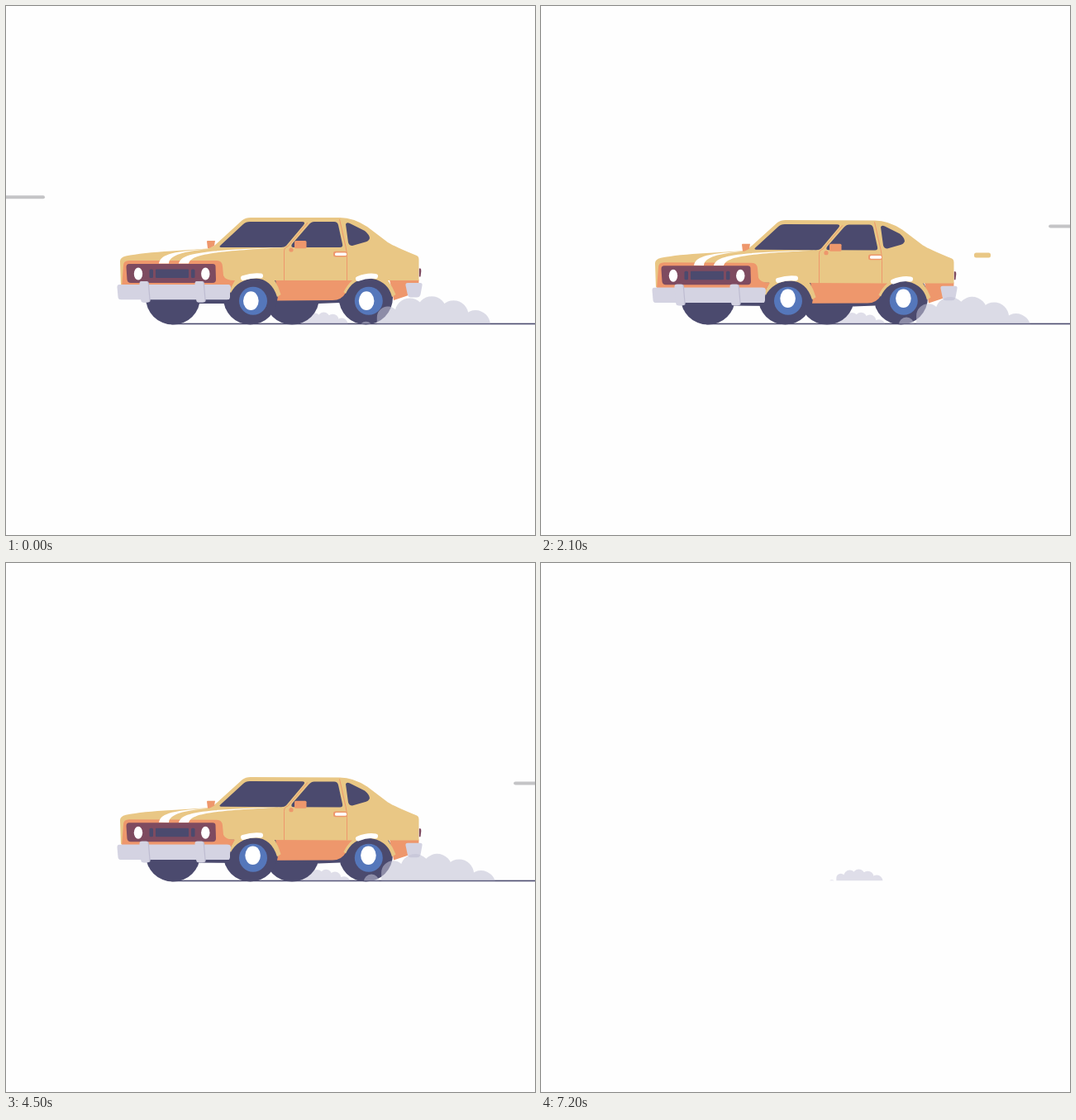
Recreate the animation shown at these times as an HTML page. Size 640x640 px, loop 7300 ms.

```html
<!DOCTYPE html>
<html lang="en">
<head>
<meta charset="utf-8">
<title>Speeding car</title>
<style>
  html, body { margin: 0; width: 100%; height: 100%; overflow: hidden; background: #fefefe; }
  svg { display: block; width: 100vw; height: 100vh; }
  .yellow { fill: #e9c785; }
  .orange { fill: #ee976c; }
  .dark { fill: #4b4a6e; }
  .maroon { fill: #7e4b60; }
  .lilac { fill: #d4d3e2; }
  .shade { fill: #bebcd1; }
  .white { fill: #fff; }
  .grey { fill: #c4c4c6; }
  .blue { fill: #5577bb; }
  .dust { fill: #c1c0d5; }
  .seam { fill: none; stroke: #ee976c; stroke-width: 1; }
  .shine { fill: none; stroke: #fff; stroke-width: 6; stroke-linecap: round; }
</style>
</head>
<body>
<svg viewBox="0 0 640 640">
  <defs>
    <clipPath id="above"><rect width="640" height="384.2"/></clipPath>
    <clipPath id="glass"><path id="glassShape"/></clipPath>
  </defs>
  <g id="back">
    <g id="streaks" class="grey"></g>
    <g id="dashes" class="yellow"></g>
    <rect class="dark" x="200" y="383.7" width="440" height="1.6"/>
  </g>
  <g clip-path="url(#above)"><path id="smallDust" class="dust" opacity=".5" transform="translate(173.3 226.6) scale(.41)"/></g>
  <g id="car">
    <g class="dark">
      <circle cx="202" cy="352.6" r="33"/>
      <circle cx="346" cy="352.6" r="33"/>
    </g>
    <g id="wheels"></g>
    <g id="body"></g>
    <g id="glint" class="white" clip-path="url(#glass)"><path id="bands" d="M263 264L284 264L288 300L267 300ZM293.5 264L299 264L302.5 300L297 300Z"/></g>
    <g id="front">
      <path class="maroon" d="M149 312H250Q253.500 312 253.500 315L254 331Q254 335 250 335H151Q147 335 146.500 331L145.500 316Q145.500 312 149 312Z"/>
      <g class="dark">
        <rect x="173.500" y="318.500" width="4.500" height="10.500" rx="1.500"/>
        <rect x="181" y="318.500" width="40" height="10.500" rx="1"/>
        <rect x="224" y="318.500" width="4.500" height="10.500" rx="1.500"/>
      </g>
      <ellipse class="white" cx="160" cy="324" rx="5.200" ry="7.500"/>
      <ellipse class="white" cx="241.300" cy="324" rx="5.200" ry="7.500"/>
    </g>
    <g id="trim">
      <path class="orange" d="M243 285Q243 284 244 284H253L252 290L246 293H244Z"/>
      <rect class="orange" x="349" y="284" width="14.500" height="9.200" rx="1.500"/>
      <circle class="orange" cx="345" cy="295" r="2.600"/>
      <rect class="orange" x="396" y="296.800" width="16.500" height="6.800" rx="2.500"/>
      <rect class="white" x="398" y="298.400" width="14" height="3.700" rx="1.500"/>
      <path class="maroon" d="M499.800 317.500H501.500Q502.500 318 502.300 321L501.500 327.500H499.800Z"/>
      <path class="lilac" d="M486 335H501Q504 335 503.500 338L501.500 349Q500.500 352.500 497 352.500H490Q486.500 352.500 485.800 349L483.500 338Q483 335 486 335Z"/>
      <rect class="lilac" x="136" y="337" width="135" height="18.300" rx="3.500"/>
      <path class="lilac" d="M137 337H269Q272 337 272 341L270 355H138Q136 355 135.500 352L134.500 340Q134.500 337 137 337Z"/>
      <g id="guards"></g>
    </g>
  </g>
  <g id="cloud" clip-path="url(#above)"><path id="bigDust" class="dust" opacity=".56"/></g>
</svg>
<script>
const LOOP = 7300, END = 7200, STEP = 100;
const NS = 'http://www.w3.org/2000/svg';
const $ = id => document.getElementById(id);

function add(parent, tag, attrs) {
  const el = document.createElementNS(NS, tag);
  for (const k in attrs) el.setAttribute(k, attrs[k]);
  parent.appendChild(el);
  return el;
}

const clamp = (v, lo, hi) => Math.min(hi, Math.max(lo, v));
const mod = (a, n) => ((a % n) + n) % n;

// Bodywork in its highest pose; every coordinate is an "x y" pair.
const windshield = 'M259 290L287 264Q290 261 295 261L358 261Q363 261 360 265L339 290Q337 292 333 292L262 292Q257 292 259 290Z';
const parts = [
  ['dark', 'M230 345L410 345L404 359L378 360L230 360Z', true],
  ['orange', 'M326 331L420 331L417 336L411 347Q406 356 395 356L328 356.5L329 351Z'],
  ['orange', 'M464 331L499.5 331L499 345L484 351L469 356L468 350Z'],
  ['yellow', 'M139 338L138 309Q138 304 145 302.5Q165 298.5 200 296.500L244 293.500L252 290L286 259Q290 256 296 256L404 256Q420 256 437 267L462 286Q470 291 497 302Q499.5 303 499.5 307L499.5 332L462 332Q468 340 471.5 349L467 352C464 338 452 329.5 438 329.5C425 329.5 416 337 411 348L408.5 346Q413 337 419 332L325 332Q330 340 332.5 349L328 352C324 338 314 329.5 302 329.5C288 329.5 277 337 272 347L270 345L276 332L262 332Z'],
  ['orange', 'M140 340L142 314Q142 308 149 308L255 308Q261.5 308 262 315L263 326Q265 332 277 332L272 341L270 347L142 345Z'],
  ['white', 'M185 311.500C187 302 196 297 245 294C215 297 198 301 197 311.500Z'],
  ['white', 'M209 311.500C212 300 230 295.500 338 292C245 297 224 301 221 311.500Z'],
  ['dark', windshield],
  ['dark', 'M346 288L366 265Q369 261 373 261L397 261Q401 261 402 265L407 288Q408 292 404 292L348 292Q344 292 346 288Z'],
  ['dark', 'M411 264Q412 261 416 263L434 272Q440 277 440 281Q439 285 433 286L419 290Q415 290 414 286Z'],
  ['seam', 'M365 262L341 291Q336.5 292 336.5 297L336.5 332'],
  ['seam', 'M403.500 258L411 291Q412.500 298 412.500 305L412.500 332'],
  ['shine', 'M287 329Q298 325.500 308 326.500'],
  ['shine', 'M426 330Q437 325.500 447 327']
];

// The rear sinks further than the nose.
const sink = x => clamp(4.3 + (x - 150) * 0.011, 4.3, 6.9);
const warp = (d, k) => d.replace(/([\d.]+) ([\d.]+)/g,
  (_, x, y) => x + ' ' + (+y + k * sink(+x)).toFixed(2));

const panels = parts.map(([cls, d]) => ({ d, el: add($('body'), 'path', { class: cls }) }));
// The underside sits behind the near wheels.
$('car').insertBefore(panels[0].el, $('wheels'));

const hubs = [299, 438.8].map((cx, i) => {
  const g = $('wheels');
  add(g, 'circle', { class: 'dark', cx: [295.5, 435.300][i], cy: 352.8, r: 32.700 });
  add(g, 'circle', { class: 'blue', cx, cy: 356.700, r: 17 });
  return { cx, el: add(g, 'ellipse', { class: 'white', rx: 9.3, ry: 11.3 }) };
});

for (const x of [161.5, 228.5]) {
  const guard = dx => `M${x + dx + 2} 333H${x + dx + 8}Q${x + dx + 10} 333 ${x + dx + 10.3} 336L${x + dx + 12} 356Q${x + dx + 12} 358.500 ${x + dx + 9} 358.500H${x + dx + 4}Q${x + dx + 2} 358.500 ${x + dx + 1.7} 356L${x + dx} 336Q${x + dx} 333 ${x + dx + 2} 333Z`;
  add($('guards'), 'path', { class: 'shade', d: guard(1.2) });
  add($('guards'), 'path', { class: 'lilac', d: guard(0) });
}

const streaks = [[231.2, 0], [266.5, 331], [320, 208], [358.5, 600]].map(([y, delay]) => ({
  delay, el: add($('streaks'), 'rect', { y: y - 2, width: 113, height: 4, rx: 2 })
}));

const dashes = [
  { y: 269.500, head: [[700, 410], [900, 437], [1100, 460], [1300, 496], [1500, 525]],
    tail: [[900, 390], [1100, 415], [1300, 460], [1500, 525]] },
  { y: 301.500, head: [[1600, 470], [2000, 544]],
    tail: [[1800, 470], [2100, 524], [2200, 544]] }
];
for (const d of dashes) d.el = add($('dashes'), 'rect', { y: d.y - 3, height: 6, rx: 2.5 });

function along(keys, t) {
  if (t <= keys[0][0]) return keys[0][1];
  for (let i = 1; i < keys.length; i++) {
    const [t0, a] = keys[i - 1], [t1, b] = keys[i];
    if (t <= t1) return a + (b - a) * (t - t0) / (t1 - t0);
  }
  return keys[keys.length - 1][1];
}

// A row of puffs rolls over a hump, one spacing every 400 ms.
function dustPath(t) {
  const p = (t % 400) / 400;
  let d = '';
  for (let j = -1; j < 7; j++) {
    const x = 435.5 + 26.500 * (j + p);
    const off = x - 509;
    const top = 351 + (off < 0 ? 0.0057 : 0.0049) * off * off;
    const r = clamp(8 + (x - 436) * 0.2, 6, 18);
    const cy = top + r;
    d += `M${x - r} 420V${cy}A${r} ${r} 0 0 1 ${x + r} ${cy}V420Z`;
  }
  return d;
}

function render(t) {
  const on = t < END;
  for (const id of ['back', 'car', 'cloud']) $(id).style.display = on ? '' : 'none';

  const dust = dustPath(t);
  $('bigDust').setAttribute('d', dust);
  $('smallDust').setAttribute('d', dust);
  if (!on) return;

  const k = (1 - Math.cos(t / 1200 * 2 * Math.PI)) / 2;
  for (const p of panels) p.el.setAttribute('d', warp(p.d, k));
  $('glassShape').setAttribute('d', warp(windshield, k));
  $('front').setAttribute('transform', `translate(0 ${4.6 * k})`);
  $('trim').setAttribute('transform', `translate(0 ${7.3 * k})`);
  $('bands').setAttribute('transform', `translate(${(t - 3100) * 0.3} 0)`);

  const a = (172 - 0.3 * t) * Math.PI / 180;
  for (const h of hubs) {
    h.el.setAttribute('cx', h.cx + 2.7 * Math.cos(a));
    h.el.setAttribute('cy', 356.3 + 2.5 * Math.sin(a));
  }

  for (const s of streaks) {
    const u = mod(t - s.delay + 200, 1200) - 200;
    s.el.setAttribute('x', -66 + 1.019 * u + 0.00031 * u * u);
  }

  const c = t % 2200;
  for (const d of dashes) {
    const x = along(d.tail, c), w = along(d.head, c) - x;
    const live = c >= d.head[0][0] && c < d.tail[d.tail.length - 1][0];
    d.el.setAttribute('x', x);
    d.el.setAttribute('width', live ? Math.max(0, w) : 0);
  }
}

const start = performance.now();
function tick() {
  const t = (performance.now() - start) % LOOP;
  render(Math.floor(t / STEP) * STEP);
  requestAnimationFrame(tick);
}
tick();
</script>
</body>
</html>
```
